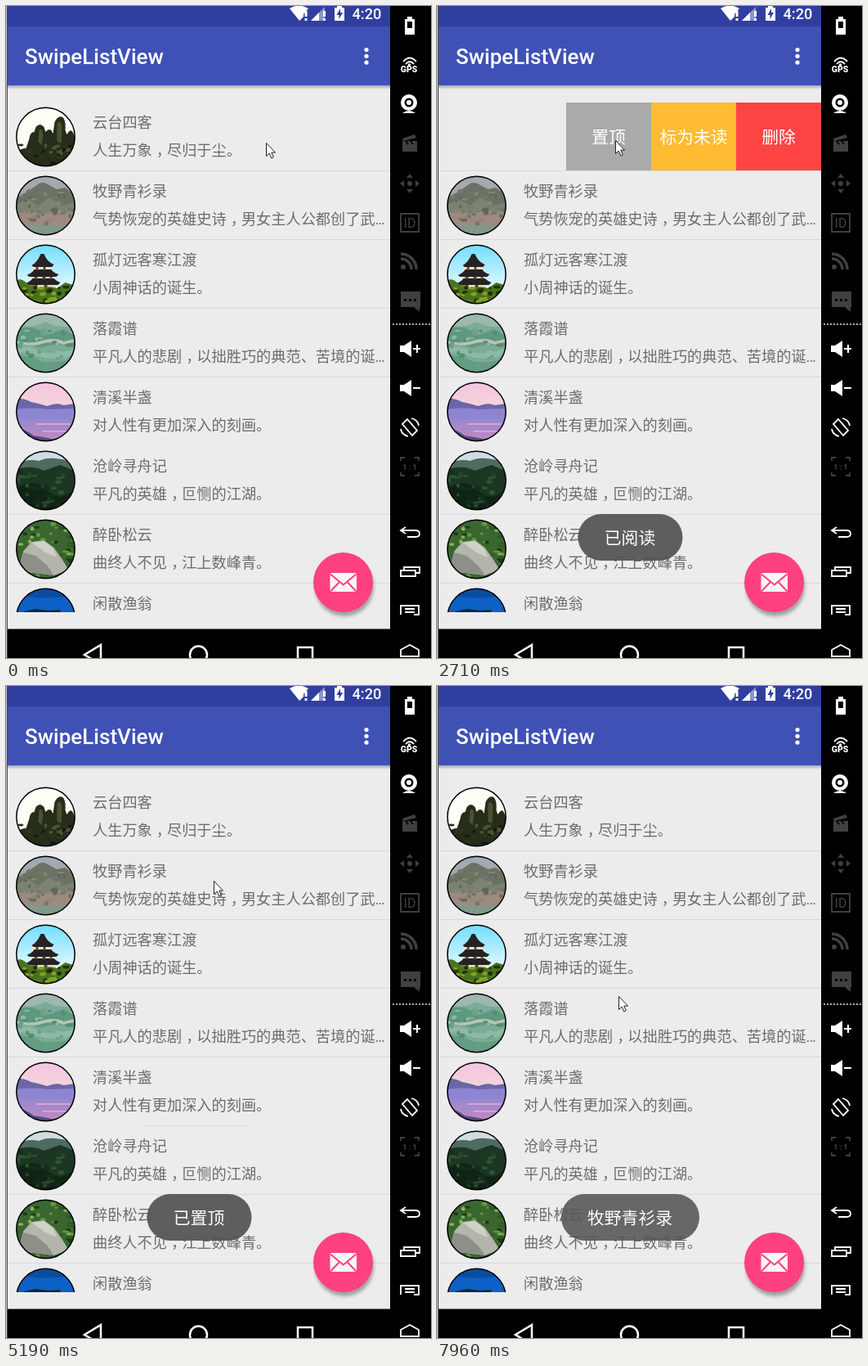
Recreate the animation shown at these times as an HTML page. Size 520x797 px, loop 7990 ms.

```html
<!DOCTYPE html>
<html lang="zh-CN">
<head>
<meta charset="utf-8">
<title>SwipeListView</title>
<style>
html, body { margin: 0; width: 100%; height: 100%; overflow: hidden; background: #000; }
svg { display: block; width: 520px; height: 797px; }
text { font-family: Roboto, "Noto Sans CJK SC", "Noto Sans CJK", sans-serif; }
.row text { font-size: 18.2px; fill: #6c6c6c; }
.btn text, #toast text { font-size: 20.8px; fill: #fff; text-anchor: middle; }
.dim { opacity: .25; }
.line { fill: none; stroke: #fff; stroke-width: 1.8; }
.nav { fill: none; stroke: #fff; stroke-width: 2.5; }
</style>
</head>
<body>
<svg viewBox="0 0 520 797" xmlns="http://www.w3.org/2000/svg">
  <defs>
    <clipPath id="list"><rect x="1" y="118" width="469" height="623"/></clipPath>
    <clipPath id="round"><circle r="36"/></clipPath>
    <linearGradient id="drop" x2="0" y2="1">
      <stop stop-color="#000" stop-opacity=".3"/><stop offset="1" stop-color="#000" stop-opacity="0"/>
    </linearGradient>
    <linearGradient id="air" x2="0" y2="1">
      <stop stop-color="#6fdcff"/><stop offset=".65" stop-color="#d6f6ff"/>
    </linearGradient>
    <linearGradient id="dusk" x2="0" y2="1">
      <stop stop-color="#f3c3df"/><stop offset=".4" stop-color="#f6d3dc"/>
      <stop offset=".55" stop-color="#8d86d4"/><stop offset="1" stop-color="#c58abf"/>
    </linearGradient>
    <filter id="blur" x="-30%" y="-30%" width="160%" height="160%"><feGaussianBlur stdDeviation="2.2"/></filter>
  </defs>

  <rect width="470" height="797" fill="#ececec"/>
  <g id="rows" clip-path="url(#list)"></g>
  <rect id="seam" x="172" y="537" width="128" height="1" fill="#dcdcdc"/>

  <rect x="2" y="97" width="468" height="5" fill="url(#drop)"/>
  <rect x="2" y="25" width="468" height="72" fill="#3f51b5"/>
  <rect x="2" width="468" height="25" fill="#303f9f"/>
  <text x="23" y="71" font-size="26" font-weight="500" fill="#fff">SwipeListView</text>
  <g fill="#fff">
    <circle cx="441" cy="53.500" r="2.600"/><circle cx="441" cy="61.300" r="2.600"/><circle cx="441" cy="69.100" r="2.600"/>
    <path d="M347 3Q358-4 370 3L364 10V13L359 18Z"/>
    <path d="M365.500 6h3v7h-3zM365.500 15h3v3h-3z"/>
    <path d="M390 1V18H373Z" opacity=".45"/>
    <path d="M383 8V18H373ZM388 6h3v7h-3zM388 15h3v3h-3z"/>
    <path d="M402 2h3V0h6v2h3v16H402Z"/>
    <path d="M409 3l-4.500 8h3v5l4.500-8h-3z" fill="#303f9f"/>
    <text x="423.500" y="15.500" font-size="18.2" font-weight="500">4:20</text>
  </g>

  <circle cx="414" cy="710" r="36" fill="#000" opacity=".32" filter="url(#blur)"/>
  <circle cx="412.500" cy="704.500" r="36.500" fill="#ff4081"/>
  <rect x="396.500" y="693" width="32.500" height="23" rx="1.500" fill="#f7f7f7"/>
  <path d="M397 694.500L412.700 707.500L428.500 694.500M397 715.500L408 704M428.500 715.500L417.500 704" fill="none" stroke="#ff4081" stroke-width="2"/>

  <g id="toast"><rect y="621" height="57" rx="28.500" fill="#555" opacity=".94"/><text x="236" y="657.500"></text></g>

  <rect x="1" y="761.500" width="469" height="36" fill="#000"/>
  <g class="nav">
    <path d="M116 781V805L96 793Z"/><circle cx="235.500" cy="793" r="10.500"/><rect x="357" y="784" width="18" height="18"/>
  </g>
  <rect width="1" height="797" fill="#c8cbd0"/>
  <rect x="1" width="1" height="797" fill="#444"/>

  <rect x="470" width="50" height="797" fill="#000"/>
  <path d="M473 389H520" stroke="#aaa" stroke-width="2" stroke-dasharray="2 2"/>
  <g id="panel" fill="#fff"></g>

  <path id="mouse" d="M0 0V16L3.700 12.600L6.300 18.500L8.800 17.400L6.300 11.600H11Z" fill="#fff" stroke="#222" stroke-width="1"/>
</svg>
<script>
const $ = s => document.querySelector(s);
const shape = (fill, d) => `<path fill="${fill}" d="${d}"/>`;
const sky = fill => shape(fill, 'M-37-37H37V37H-37Z');

// Small seeded scatter of leaves for the textured pictures
function leaves(seed, n, top, bottom, colors) {
  let s = seed, out = '';
  const rnd = () => (s = s * 16807 % 2147483647) / 2147483647;
  for (let i = 0; i < n; i++) {
    const x = rnd() * 72 - 36, y = top + rnd() * (bottom - top);
    out += `<ellipse cx="${x.toFixed(1)}" cy="${y.toFixed(1)}" rx="${(1.5 + rnd() * 3).toFixed(1)}" ry="${(1 + rnd() * 1.8).toFixed(1)}" fill="${colors[i % colors.length]}"/>`;
  }
  return out;
}

const pictures = [
  // standing rocks
  sky('#fffef6') +
    shape('#262d1a', 'M-37 22Q-31 13-24 14L-20 2Q-19-6-14-6L-12-12Q-7-18-2-12L0-6Q3-11 7-8L9-4L11-18Q15-27 21-24Q25-20 24-8L26-3Q31-12 34-4L37 4V37H-37Z') +
    shape('#4b5232', 'M14-16Q18-22 20-12L19 8L14 6ZM-8-8Q-4-12-3-2L-5 10L-9 6Z') +
    leaves(7, 44, 10, 35, ['#12180c', '#4c552f', '#2b351c']),
  // hills above a lake
  sky('#a3a9b0') +
    shape('#6a7263', 'M-37-10L-24-16L-8-27Q-2-30 6-24L14-20L24-22L37-12V37H-37Z') +
    shape('#7c8272', 'M-37 0L-22-8L-8 0L4-10L20 0L37-4V14H-37Z') +
    shape('#9d897f', 'M-37 10L-20 7L-4 11L12 5L37 9V25H-37Z') + shape('#82988a', 'M-37 25Q0 22 37 25V37H-37Z') +
    leaves(21, 40, -18, 22, ['#5e6658', '#858474', '#727968']),
  // pavilion
  sky('url(#air)') +
    shape('#efe3cd', 'M-16-12H8V-4H-16ZM-18 0H11V7H-18ZM-19 10H13V18H-19Z') +
    shape('#262223', 'M-17-11Q-10-15-6-25H-2Q1-16 10-12L8-9H-15ZM-23 1Q-16-2-14-6H7Q9-2 16 0L13 3H-20ZM-24 11Q-18 8-16 5H10Q13 8 18 10L15 13H-22Z') +
    shape('#55463c', 'M-12-9h3v4h-3zM-3-9h3v4h-3zM-14 3h4v3h-4zM-4 3h4v3h-4zM5 3h3v3h-3zM-14 13h4v5h-4zM-2 13h4v5h-4z') +
    shape('#4b701d', 'M-37 8Q-30 3-22 12L-10 18Q4 13 14 17L24 10L37 14V37H-37Z') +
    leaves(33, 46, 14, 35, ['#80a326', '#1e300b', '#51791c']),
  // green valley with a river
  sky('#79ab97') + shape('#9db8ac', 'M-37-37H37V-22Q18-16 0-26Q-18-16-37-24Z') +
    shape('#5f9880', 'M-37-16Q-16-24 2-10L22-17L37-8V6Q10-2-6 6Q-24-4-37 4Z') +
    shape('#b9c5b0', 'M-37-3Q-18 1-8-2Q10-8 22-2L37-5V-2L22 2Q8-4-8 2Q-20 4-37 0Z') +
    shape('#8dbaa6', 'M-37 5Q-18 2-8 10Q10 16 37 6V14Q12 23-10 16Q-24 10-37 12Z') +
    shape('#649c80', 'M-37 16Q-20 14-6 22Q16 26 37 18V37H-37Z') +
    leaves(45, 34, -18, 34, ['#6da188', '#8ab9a2', '#568d70']),
  // lake at dusk
  sky('url(#dusk)') +
    shape('#6a66a8', 'M-37-16Q-28-17-18-12Q-8-10 2-7Q14-12 22-8L37-10V1H-37Z') +
    shape('#8d85d0', 'M-37-3Q-14-6 2-3L37-4V9H-37Z') + shape('#574b86', 'M-37 20Q-25 21-15 29L8 33V37H-37Z') +
    shape('#d3a2d2', 'M-12 14H30V16H-12ZM-4 23H35V25H-4Z'),
  // dark forest
  sky('#cfdde4') + shape('#4d6b60', 'M-37-20Q-22-27-8-24Q8-32 37-21V10H-37Z') +
    shape('#1b3622', 'M-37-13Q-18-20-2-12L18-19L37-11V37H-37Z') + shape('#102415', 'M-37 10Q-14-4 2 12T37 10V37H-37Z') +
    leaves(57, 40, -10, 32, ['#284a2b', '#152c1a', '#2f5433']),
  // boulder in the grass
  sky('#3b6630') + leaves(71, 70, -34, 34, ['#5f9a3a', '#1d3a17', '#82b65a', '#305922']) +
    shape('#b4b6ae', 'M-31 16L-27 2L-17-9L-2-11L10-2L20 12L28 25L10 32L-22 28Z') +
    shape('#8d9088', 'M-27 4L-12 8L2 20L10 32L-22 28L-31 16Z') +
    shape('#d0d1cb', 'M-17-8L-2-10L9-1L14 10L0 4Z'),
  // deep blue sky
  sky('#0c60c6') + shape('#0a4d9f', 'M-37-37H37V-28Q0-21-37-28Z') + shape('#16283e', 'M-26-8L-12-11L4-9L18-10V0H-26Z')
];

const items = [
  ['云台四客', '人生万象，尽归于尘。'],
  ['牧野青衫录', '气势恢宠的英雄史诗，男女主人公都创了武…'],
  ['孤灯远客寒江渡', '小周神话的诞生。'],
  ['落霞谱', '平凡人的悲剧，以拙胜巧的典范、苦境的诞…'],
  ['清溪半盏', '对人性有更加深入的刻画。'],
  ['沧岭寻舟记', '平凡的英雄，叵恻的江湖。'],
  ['醉卧松云', '曲终人不见，江上数峰青。'],
  ['闲散渔翁', '']
];
const buttons = [['置顶', '#aaa'], ['标为未读', '#fb3'], ['删除', '#f44']];

// Commas sit in the middle of their cell
const centred = s => s.replace(/，(.*)/, '<tspan dx="5">，</tspan><tspan dx="-5">$1</tspan>');

const row = ([title, note], i) => `
  <g class="row" transform="translate(0 ${118 + 84 * i})"><g id="row${i}">
    <g transform="translate(48.500 42)"><g clip-path="url(#round)">${pictures[i]}</g>
      <circle r="35.700" fill="none" stroke="#000" stroke-width="1.500"/></g>
    <text x="106" y="31">${title}</text><text x="106" y="65">${centred(note)}</text>
    ${i ? '' : buttons.map(([label, fill], k) => `<g class="btn" transform="translate(${470 + 104 * k} 0)">
      <rect width="104.500" height="83" fill="${fill}"/><text x="52" y="50">${label}</text></g>`).join('')}
  </g>${i === 4 ? '' : '<rect x="2" y="83" width="468" height="1" fill="#d8d8d8"/>'}</g>`;
$('#rows').innerHTML = items.map(row).join('');

// Emulator side bar: [centre y, dimmed, markup around 0,0]
const speaker = '<path d="M-12-4H-7L2-10V10L-7 4H-12Z"/>';
const line = d => `<path class="line" d="${d}"/>`;
const icons = [
  [24, 0, '<path d="M-3-11H3V-8H6V11H-6V-8H-3Z"/><path d="M-3-5H3V3H-3Z" fill="#000"/>'],
  [72, 0, line('M-8-4Q0-13 8-4M-5-1Q0-7 5-1') + '<circle cx="-.500" cy="0" r="1.800"/><text x="-1" y="9" font-size="10.500" font-weight="900" text-anchor="middle">GPS</text>'],
  [120, 0, '<circle cx="-1" cy="-2" r="10"/><circle cx="-1" cy="-2" r="5.500" fill="#000"/><circle cx="-1" cy="-2" r="3"/><path d="M-9 11Q-1 5 7 11Z"/>'],
  [168, 1, '<path d="M-9-3H9V10H-9ZM-9-6L6-11L8-7L-8-3Z"/><path d="M-5-3l3 4M1-3l3 4" stroke="#000" stroke-width="2"/>'],
  [217, 1, '<path d="M0-12L4-7H-4ZM0 12L4 7H-4ZM-12 0L-7-4V4ZM12 0L7-4V4Z"/><circle r="3"/>'],
  [265, 1, line('M-11-11H11V11H-11Z') + '<text y="6" font-size="16" text-anchor="middle">ID</text>'],
  [312, 1, '<circle cx="-8" cy="7" r="3"/><path d="M-11-3A13 13 0 0 1 2 10M-11-9A19 19 0 0 1 8 10" fill="none" stroke="#fff" stroke-width="3.500"/>'],
  [360, 1, '<path d="M-11-11H13V8H12V14L5 8H-11Z"/><path d="M-7-2h3v3h-3zM-1-2h3v3h-3zM5-2h3v3h-3z" fill="#000"/>'],
  [419, 0, speaker + '<path d="M4-1H8V-5H10V-1H13V1H10V5H8V1H4Z"/>'],
  [467, 0, speaker + '<path d="M4-1H13V1H4Z"/>'],
  [515, 0, line('M-9-4L-3-10L9 4L3 10ZM2-11Q10-9 11-2M-2 11Q-10 9-11 2')],
  [563, 1, line('M-11-7V-11H-6M6-11H11V-7M11 7V11H6M-6 11H-11V7') + '<text y="4" font-size="9" font-weight="700" text-anchor="middle">1 : 1</text>'],
  [643, 0, line('M-5-6L-11-2L-5 2M-11-2H7Q12-2 12 2T7 6H-3')],
  [691, 0, line('M-11-1H7V6H-11ZM-7-1V-5H12V2H7')],
  [739, 0, line('M-11 5V-6H11V5H5M-6-2H6M-6 2H6')],
  [788, 0, line('M-11 7V-1L0-7L11-1V7Z')]
];
$('#panel').innerHTML = icons.map(([y, dim, art]) =>
  `<g transform="translate(494 ${y})"${dim ? ' class="dim"' : ''}>${art}</g>`).join('');

const LOOP = 7990, OPEN = -312;
// Pointer stops: time, x, y
const stops = [
  [120, 319, 167], [890, 114, 149], [980, 114, 149], [1400, 311, 163], [2390, 311, 163],
  [2710, 219, 163.5], [3740, 219, 163.5], [4260, 219, 240], [4420, 219, 240], [4880, 251, 253],
  [5130, 251, 253], [5190, 255, 238], [6910, 255, 238], [7240, 226, 317], [7510, 226, 317], [7960, 223, 379]
];
// Toasts: label, half width, fade in start and end, fade out start and end
const toasts = [
  ['已阅读', 64, 1740, 2190, 3740, 3980],
  ['已置顶', 64, 3990, 4260, 5570, 5810],
  [items[1][0], 84.5, 5820, 6290, 7930, 8430]
];
const clamp = v => Math.max(0, Math.min(1, v));
const ramp = (t, a, b) => clamp((t - a) / (b - a));
const ease = p => p * p * (3 - 2 * p);

function pointer(t) {
  let i = 0;
  while (i < stops.length - 2 && t > stops[i + 1][0]) i++;
  const [a, x, y] = stops[i], [b, u, v] = stops[i + 1];
  const p = ease(ramp(t, a, b));
  return [x + (u - x) * p, y + (v - y) * p];
}

function slide(t, x) {
  if (t < 890) return Math.min(0, x - 253);
  if (t < 4380) return OPEN - (OPEN + 139) * Math.exp(-(t - 890) / 70);
  return OPEN * Math.exp(-(t - 4380) / 41);
}

const topRow = $('#row0'), mouse = $('#mouse'), toast = $('#toast');
const pill = toast.querySelector('rect'), label = toast.querySelector('text'), seam = $('#seam');

function draw(t) {
  const [x, y] = pointer(t);
  mouse.setAttribute('transform', `translate(${Math.round(x) - .5} ${Math.round(y) + .5})`);
  topRow.setAttribute('transform', `translate(${Math.round(slide(t, x))} 0)`);
  const now = toasts.find(n => t >= n[2] && t < n[5]);
  toast.setAttribute('opacity', now ? ramp(t, now[2], now[3]) * (1 - ramp(t, now[4], now[5])) : 0);
  if (now) {
    pill.setAttribute('x', 236.5 - now[1]);
    pill.setAttribute('width', now[1] * 2);
    if (label.textContent !== now[0]) label.textContent = now[0];
  }
  seam.setAttribute('opacity', t >= 3980 && t < 5810 ? 1 : 0);
}

const start = performance.now();
function tick() {
  draw((performance.now() - start) % LOOP);
  requestAnimationFrame(tick);
}
tick();
</script>
</body>
</html>
```
